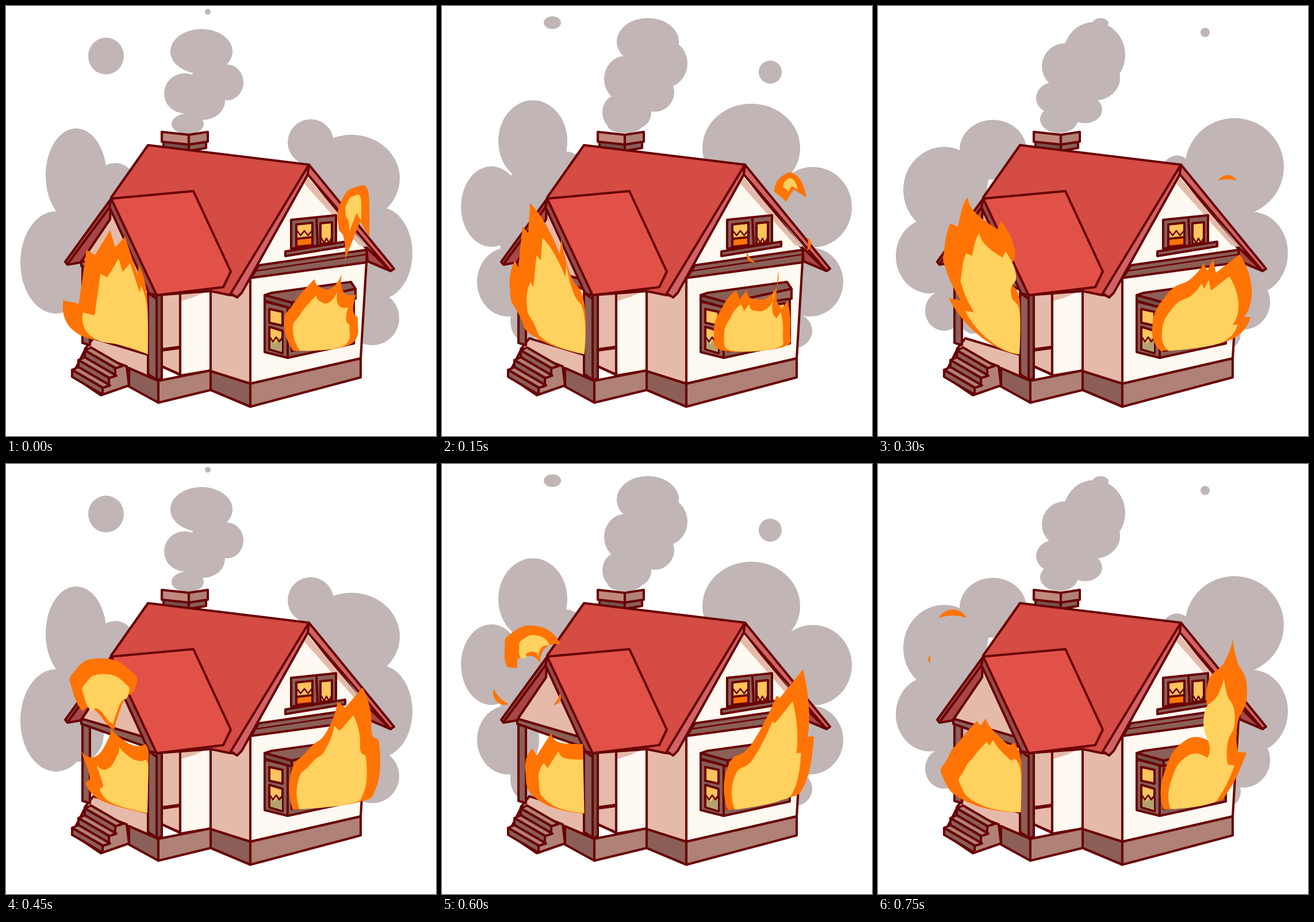
An HTML page with a canvas that plays this animation: 748x748 px, repeating every 0.9 s.

```html
<!DOCTYPE html>
<html lang="en">
<head>
<meta charset="utf-8">
<title>Burning house</title>
<style>
  html, body { margin: 0; width: 100%; height: 100%; overflow: hidden; background: #fff; }
  canvas { display: block; }
</style>
</head>
<body>
<canvas id="stage" width="748" height="748"></canvas>
<script>
const ctx = document.getElementById('stage').getContext('2d');
const STEP = 150, POSES = 6, LINE = 4.1;
const INK = '#690305', SMOKE = '#c1b5b5', ORANGE = '#ff7404', YELLOW = '#ffd15e', GLOW = '#fec45c';
const CREAM = '#fef9f1', PINK = '#e5baaa', DARK = '#77504a', BROWN = '#8b5f57', TAN = '#b08176';
const ROOF = '#d44c44', PORCH_ROOF = '#e25147', TRIM = '#cf6265', TRIM_DARK = '#a64746';

const points = s => s.split(' ').map(p => p.split(',').map(Number));

function trace(pts) {
  ctx.beginPath();
  pts.forEach(p => ctx.lineTo(...p));
}

function fillShape(color, pts, inked = true) {
  trace(pts);
  ctx.closePath();
  ctx.fillStyle = color;
  ctx.fill();
  if (inked) ctx.stroke();
}

const shape = (color, s, inked) => fillShape(color, points(s), inked);

// A wall in perspective: upright sides, slanted top and bottom.
function panel(color, x, y, w, h, slant, farH = h) {
  const far = y + slant;
  fillShape(color, [[x, y], [x + w, far], [x + w, far + farH], [x, y + h]]);
}

function line(pts, width = LINE) {
  ctx.lineWidth = width;
  trace(pts);
  ctx.stroke();
  ctx.lineWidth = LINE;
}

// Closed smooth outline; sharp turns stay pointed.
function blob(color, pts) {
  const n = pts.length, at = i => pts[(i + n) % n];
  const tangent = i => {
    const [a, b, c] = [at(i - 1), at(i), at(i + 1)];
    const ux = b[0] - a[0], uy = b[1] - a[1], vx = c[0] - b[0], vy = c[1] - b[1];
    const lu = Math.hypot(ux, uy), lv = Math.hypot(vx, vy);
    if (ux * vx + uy * vy < 0.25 * lu * lv) return [0, 0];
    const k = Math.min(lu, lv) / (lu + lv) / 1.5;
    return [(ux + vx) * k, (uy + vy) * k];
  };
  ctx.beginPath();
  ctx.moveTo(...pts[0]);
  for (let i = 0; i < n; i++) {
    const a = at(i), b = at(i + 1), s = tangent(i), e = tangent(i + 1);
    ctx.bezierCurveTo(a[0] + s[0], a[1] + s[1], b[0] - e[0], b[1] - e[1], ...b);
  }
  ctx.fillStyle = color;
  ctx.fill();
}

// The yellow core repeats the flame, shrunk towards its root.
function flame(s, x, y, scale = 0.77) {
  const pts = points(s);
  blob(ORANGE, pts);
  blob(YELLOW, pts.map(p => [x + (p[0] - x) * scale, y + (p[1] - y) * scale]));
}

const porchFlame = s => flame(s, 246, 604);
const windowFlame = s => flame(s, 550, 599);

// Crescent that bulges towards the given angle in degrees.
function ember(x, y, r, degrees) {
  const a = degrees * Math.PI / 180, span = 1.1;
  ctx.beginPath();
  ctx.arc(x, y, r, a - span, a + span);
  ctx.quadraticCurveTo(x + r * 0.75 * Math.cos(a), y + r * 0.75 * Math.sin(a),
    x + r * Math.cos(a - span), y + r * Math.sin(a - span));
  ctx.fillStyle = ORANGE;
  ctx.fill();
}

// Puffs are cx,cy,rx,ry; the space between their centres is filled too.
function cloud(s) {
  const puffs = points(s);
  fillShape(SMOKE, puffs.map(p => p.slice(0, 2)), false);
  for (const [x, y, rx, ry] of puffs) {
    ctx.beginPath();
    ctx.ellipse(x, y, rx, ry, 0, 0, Math.PI * 2);
    ctx.fill();
  }
}

const smoke = [
  () => {
    cloud('174,87,31,32');
    cloud('351,10,5,5');
    cloud('340,79,54,39 385,133,28,31 343,165,38,33 316,205,28,18 311,152,36,35');
    cloud('122,295,53,82 190,310,35,37 128,470,42,48 87,446,62,89');
    cloud('530,237,40,40 601,300,84,76 650,430,57,80 637,543,47,47 560,420,60,90');
  },
  () => {
    cloud('192,29,15,11');
    cloud('571,115,20,20');
    cloud('358,62,54,41 385,100,42,43 370,150,34,34 335,186,29,28 318,208,30,13 304,185,25,30 318,127,36,40');
    cloud('158,235,60,71 215,285,32,32 145,548,26,36 115,480,54,60 86,349,53,70');
    cloud('538,247,85,77 645,350,68,70 640,480,58,60 612,565,32,30 560,400,50,90');
  },
  () => {
    cloud('569,46,8,8');
    cloud('387,30,14,9 376,85,54,57 375,125,46,40 360,180,30,24 315,197,33,24 305,160,30,27 325,105,40,40');
    cloud('200,250,58,52 165,480,40,90 115,530,33,35 90,435,59,65 115,320,71,75');
    cloud('520,285,25,25 620,280,86,85 650,430,63,72 635,515,47,48 608,570,23,26');
  }
];

function steps() {
  shape(TAN, '137,599 210,627 214,660 165,677 115,643');
  for (let i = 0; i < 3; i++) {
    const x = 137 - 11 * i, y = 599 + 17 * i;
    fillShape(TAN, [[x, y], [x + 11, y - 5], [x + 66, y + 27], [x + 54, y + 31]]);
    panel(BROWN, x, y, 53, 12, 31);
  }
}

function porch() {
  shape(PINK, '137,597 152,578 248,607 264,652 208,628');
  panel(BROWN, 133, 450, 13, 136, 4);
  panel(PINK, 270, 502, 33, 124, -3, 143);
  line([[271, 627], [303, 641]]);
  line([[272, 598], [302, 594]], 6);
  panel(CREAM, 303, 500, 53, 143, -9);
  shape(PINK, '305,500 354,494 328,506 305,513', false);
  panel(BROWN, 214, 630, 51, 32, 22, 38);
  panel(TAN, 265, 652, 91, 38, -18, 34);
  steps();
  shape(PINK, '182,352 132,444 245,477');
  panel(BROWN, 131, 443, 113, 9, 33, 16);
  panel(BROWN, 247, 499, 16, 141, 11);
  panel(DARK, 262, 503, 9, 148, -3);
}

function shards(x, y, w) {
  line([0, 1, 2, 3, 4].map(i => [x + w * i / 4, y + (i % 2 ? 4 : -4)]), 2.6);
}

function atticWindow() {
  panel(BROWN, 496, 372, 78, 50, -8, 49);
  panel(GLOW, 505, 380, 28, 39, -3);
  panel(ORANGE, 505, 405, 28, 14, -3);
  panel(GLOW, 547, 378, 20, 36, -2);
  shards(506, 395, 26);
  shards(549, 408, 17);
  line([[540, 370], [542, 414]]);
  panel(BROWN, 486, 427, 104, 8, -17);
}

function bayWindow() {
  panel(BROWN, 450, 514, 40, 88, 10);
  panel(GLOW, 458, 527, 23, 24, 5);
  panel(GLOW, 458, 558, 23, 39, 7);
  shape('#b3a270', '460,578 467,588 475,577 480,583 480,602 460,596', false);
  shards(459, 580, 22);
  panel(BROWN, 490, 524, 115, 88, -15, 78);
  panel(GLOW, 497, 531, 100, 69, -14, 62);
  shape(BROWN, '450,503 462,499 600,480 608,492 497,516');
  panel(DARK, 450, 503, 47, 10, 13);
  panel('#9a6c63', 497, 516, 111, 9, -24, 17);
}

function house() {
  ctx.strokeStyle = INK;
  ctx.lineWidth = LINE;
  ctx.lineJoin = ctx.lineCap = 'round';

  panel(DARK, 274, 236, 44, 11, 5);
  panel(BROWN, 318, 241, 30, 11, -5);
  panel('#c18a7f', 271, 219, 47, 17, 5);
  panel(TAN, 318, 224, 33, 17, -5);
  porch();

  shape(PINK, '356,495 402,505 426,470 425,657 356,636');
  panel(BROWN, 356, 635, 69, 33, 22, 40);
  shape(CREAM, '525,292 628,424 627,446 617,613 425,657 425,472');
  shape(PINK, '524,297 628,420 614,416 519,309', false);
  panel(TAN, 425, 657, 192, 40, -44, 33);
  shape(BROWN, '440,451 628,424 627,446 426,473');
  line([[434, 461], [628, 432]], 2.5);
  atticWindow();
  bayWindow();

  shape(ROOF, '247,242 527,276 390,503 356,496 262,503 183,333');
  shape(TRIM, '527,276 391,500 402,507 410,499 525,293');
  shape(TRIM_DARK, '627,420 669,461 629,444');
  shape(TRIM, '527,276 675,457 669,461 525,293');
  shape(TRIM_DARK, '183,335 103,445 107,450 130,446 181,371');
  line([[181, 349], [107, 449]]);
  shape('#964a48', '183,335 190,336 262,503 249,500 180,350');
  shape(PORCH_ROOF, '183,335 326,322 391,462 378,489 262,503');
}

const porchFire = [
  () => porchFlame('181,390 190,420 207,401 229,468 231,451 245,500 247,606 195,588 118,565 100,512 127,518 140,424 155,433 172,405'),
  () => porchFlame('153,343 180,379 205,432 208,403 222,463 247,515 248,606 165,578 133,535 118,490 127,443 133,455 140,383 150,395'),
  () => porchFlame('156,333 170,360 208,388 214,374 238,425 227,468 246,510 246,606 178,575 123,508 144,512 118,458 116,418 126,378 139,384 148,347'),
  () => {
    flame('116,395 118,362 165,338 219,362 225,390 205,412 188,462 178,455 150,424 133,430', 183, 430, 0.7);
    porchFlame('178,478 182,458 200,477 225,490 242,487 248,502 246,608 165,585 138,553 146,545 131,500 155,509');
  },
  () => {
    flame('109,325 120,295 170,283 206,314 180,320 171,348 155,334 131,340 131,355 114,354', 165, 318, 0.55);
    ember(110, 398, 21, 135);
    ember(194, 406, 13, 30);
    porchFlame('190,468 203,484 245,487 248,608 170,586 145,535 157,495 165,507');
  },
  () => {
    ember(130, 280, 27, -90);
    ember(95, 340, 8, 180);
    porchFlame('172,447 178,456 187,443 200,463 228,490 236,485 249,515 249,606 160,590 113,545 122,510 145,478');
  }
];

const windowFire = [
  () => {
    flame('578,382 583,340 608,315 630,322 632,402 616,375 590,441 588,405', 604, 345, 0.5);
    windowFlame('537,475 545,488 567,490 584,466 587,497 609,502 604,530 612,547 596,590 500,600 484,555 500,518');
  },
  () => {
    flame('578,324 590,297 618,296 634,333 612,319 598,341 590,332', 606, 308, 0.45);
    ember(629, 414, 13, 0);
    ember(542, 434, 12, 140);
    windowFlame('512,495 518,510 530,494 540,509 575,500 585,462 582,510 592,526 601,513 606,560 594,593 492,600 473,568 490,520');
  },
  () => {
    ember(608, 312, 18, -90);
    windowFlame('566,448 573,460 583,440 588,464 629,432 650,490 637,541 648,541 610,582 492,600 477,562 500,505 545,474');
  },
  () => windowFlame('620,389 633,425 637,470 649,485 645,560 610,589 499,601 495,540 525,498 558,465 577,413 590,424'),
  () => windowFlame('628,357 638,420 636,474 647,474 632,555 595,583 497,602 496,530 540,485 582,403 588,407'),
  () => windowFlame('617,303 624,340 642,395 625,455 627,501 641,502 612,565 580,590 497,601 497,540 536,480 580,485 585,460 572,390 604,342')
];

let shown = -1;
function draw(ms) {
  const pose = Math.floor(ms / STEP) % POSES;
  if (pose === shown) return;
  shown = pose;
  ctx.fillStyle = '#fff';
  ctx.fillRect(0, 0, 748, 748);
  smoke[pose % smoke.length]();
  house();
  porchFire[pose]();
  windowFire[pose]();
}

const start = performance.now();
function tick() {
  draw(performance.now() - start);
  requestAnimationFrame(tick);
}
tick();
</script>
</body>
</html>
```
